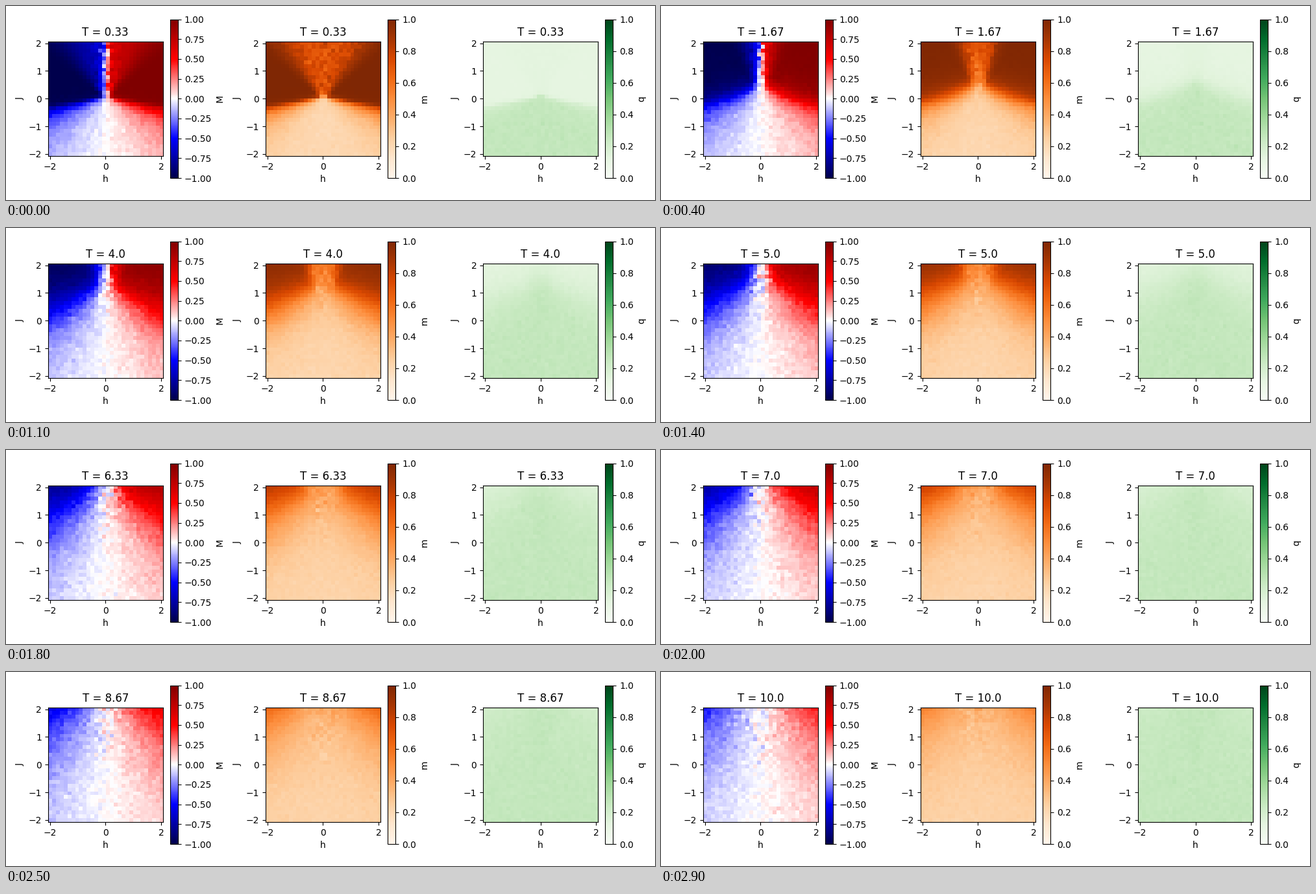
Animation, 1000 px wide and 300 px high, one loop 3000 ms. Source, as a matplotlib script:

```python
import numpy as np
import matplotlib.pyplot as plt
from matplotlib.animation import FuncAnimation

FRAMES, INTERVAL = 30, 100
CELLS, SPINS = 30, 30
NOISE_FLOOR = 0.04

axis = np.linspace(-2, 2, CELLS)
field, coupling = np.meshgrid(axis, axis)
neighbours = np.where(coupling > 0, 3.7, 6.5)

# Magnetisation levels and their entropy per spin
levels = np.linspace(-1, 1, 301)
up = np.clip((1 + levels) / 2, 1e-9, 1)
entropy = -up * np.log(up) - up[::-1] * np.log(up[::-1])


def equilibrium(temp):
    """Mean and mean square magnetisation of a small mean-field magnet."""
    energy = ((neighbours * coupling / 2)[..., None] * levels**2
              + field[..., None] * levels)
    log_weight = SPINS * (entropy + energy / temp)
    weight = np.exp(log_weight - log_weight.max(axis=2, keepdims=True))
    weight /= weight.sum(axis=2, keepdims=True)
    return weight @ levels, weight @ levels**2


def phase_maps(frame):
    """Return the M, m and q maps for one temperature step."""
    temp = (frame + 1) / 3
    rng = np.random.default_rng(100 + frame)
    mean, square = equilibrium(temp)
    size = np.sqrt(NOISE_FLOOR + (1 - NOISE_FLOOR) * square)

    # Domains freeze in a wedge around zero field
    ferro = np.maximum(coupling, 0)
    wedge_width = 0.05 + ferro * (
        0.75 / (1 + (temp / 0.9)**2) + 0.1 + 0.03 * temp)
    wedge = np.exp(-(np.abs(field) / wedge_width)**3) * (coupling > 0)
    frozen = 0.26 + 0.45 * (1 - np.exp(-(2.2 * ferro / temp)**1.6))
    order = (1 - wedge) * size + wedge * np.minimum(size, frozen)
    total = mean * order / size * (1 - wedge * np.exp(-np.abs(field) / 0.12))

    spread = np.sqrt(np.maximum(order**2 - total**2, 0))
    total = total + (0.1 + 0.1 * wedge) * spread * rng.normal(size=total.shape)
    local = order + (0.01 + 0.07 * wedge * order) * np.sqrt(
        np.maximum(1 - order**2, 0)) * rng.normal(size=order.shape)
    overlap = 0.115 + 0.155 * (1 - size**2) + 0.012 * wedge
    overlap += 0.008 * np.sqrt(1.05 - size**2) * rng.normal(size=size.shape)
    return np.clip(total, -1, 1), np.clip(local, 0, 1), overlap


def make_panel(ax, name, cmap, low):
    edge = 2 + 2 / (CELLS - 1)
    image = ax.imshow(np.zeros((CELLS, CELLS)), cmap=cmap, vmin=low, vmax=1,
                      origin="lower", interpolation="nearest",
                      extent=(-edge, edge, -edge, edge))
    ax.set_xticks([-2, 0, 2])
    ax.set_yticks(range(-2, 3))
    ax.set_xlabel("h")
    ax.set_ylabel("J")
    fig.colorbar(image, ax=ax, label=name)
    return image, ax.set_title("T = 0.33")


plt.rcParams["font.family"] = "DejaVu Sans"
fig, axes = plt.subplots(1, 3, figsize=(10, 3), dpi=100)
styles = [("M", "seismic", -1), ("m", "Oranges", 0), ("q", "Greens", 0)]
panels = [make_panel(ax, *style) for ax, style in zip(axes, styles)]
fig.tight_layout()


def update(frame):
    label = f"T = {round((frame + 1) / 3, 2)}"
    for (image, title), data in zip(panels, phase_maps(frame)):
        image.set_data(data)
        title.set_text(label)
    return [artist for panel in panels for artist in panel]


anim = FuncAnimation(fig, update, frames=FRAMES, interval=INTERVAL,
                     repeat=True, repeat_delay=0)
plt.show()
```
